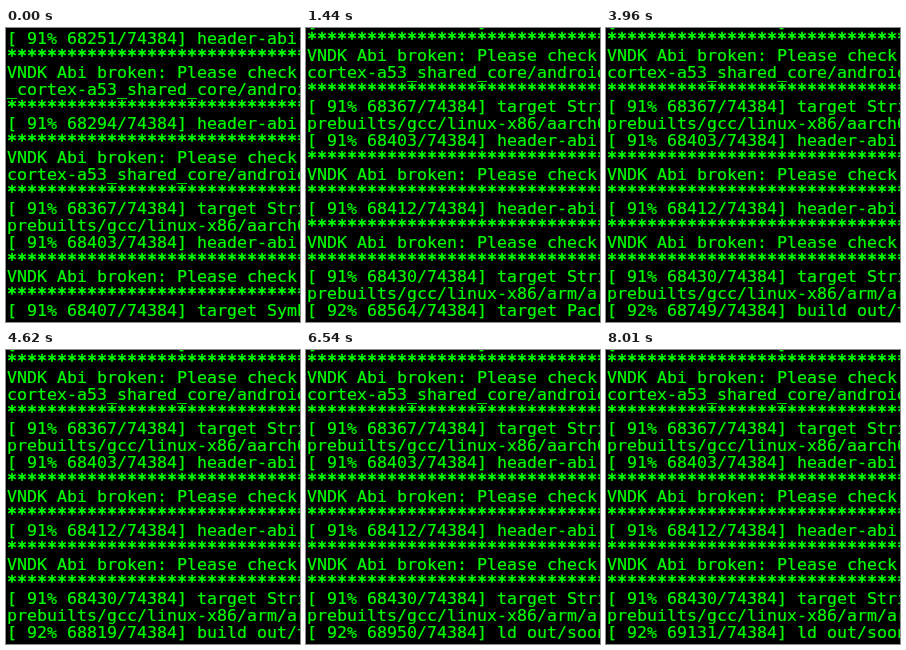
An HTML page with a canvas for the animation above (8.04 s loop, 294 by 294 pixels).

```html
<!DOCTYPE html>
<html lang="en">
<head>
<meta charset="utf-8">
<title>Build log</title>
<style>
html, body { margin: 0; width: 100%; height: 100%; overflow: hidden; background: #000; }
canvas { display: block; }
</style>
</head>
<body>
<canvas id="screen" width="294" height="294"></canvas>
<script>
const ctx = document.getElementById('screen').getContext('2d');
const LOOP = 8040, TICK = 30, TOTAL = 74384;
const LINE = 17, ROWS = 18, LEFT = 1, LAST_BASELINE = 288;

const STARS = '*'.repeat(30);
const BROKEN = 'VNDK Abi broken: Please check ';
const HEADER = 'header-abi-diff', STRIP = 'target Strip', SYMBOLS = 'target Symbolic';
const PACKAGE = 'target Package', BUILD = 'build out/target', LINK = 'ld out/soong';

const job = (count, task, ...output) => ({ count, task, output });
const abiJob = (count, ...paths) => job(count, HEADER, STARS, BROKEN, ...paths, STARS);

const JOBS = [
  abiJob(68251, '_cortex-a53_shared_core/android'),
  abiJob(68294, 'cortex-a53_shared_core/android'),
  job(68367, STRIP, 'prebuilts/gcc/linux-x86/aarch64'),
  abiJob(68403),
  abiJob(68412),
  job(68430, STRIP, 'prebuilts/gcc/linux-x86/arm/arm')
];

// Each stage starts at a time with a step count and its usual task
const STAGES = [
  { time: 0, count: 68407, task: SYMBOLS },
  { time: 690, count: 68430, task: STRIP },
  { time: 720, count: 68510, task: PACKAGE },
  { time: 2790, count: 68664, task: BUILD },
  { time: 3960, count: 68749, task: BUILD },
  { time: 5310, count: 68893, task: HEADER },
  { time: 6540, count: 68950, task: LINK },
  { time: 8010, count: 69131, task: LINK }
];

const progress = ({ count, task }) =>
  `[ ${Math.floor(count / TOTAL * 100)}% ${count}/${TOTAL}] ${task}`;

// Steps advance evenly within a stage; every seventh one is another kind of task.
function statusAt(time) {
  const index = STAGES.findLastIndex(stage => stage.time <= time);
  const from = STAGES[index], to = STAGES[index + 1] || from;
  const part = (time - from.time) / (to.time - from.time || 1);
  const count = Math.round(from.count + (to.count - from.count) * part);
  const other = from.task === HEADER ? LINK : HEADER;
  return { count, task: count % 7 === 5 ? other : from.task };
}

function draw(time) {
  const status = statusAt(time);
  const lines = JOBS.filter(({ count }) => count < status.count)
    .flatMap(done => [progress(done), ...done.output]);
  lines.push(progress(status));

  ctx.fillStyle = '#000';
  ctx.fillRect(0, 0, 294, 294);
  ctx.fillStyle = ctx.strokeStyle = '#0f0';
  ctx.font = '16.61px "DejaVu Sans Mono", monospace';
  lines.slice(-ROWS).reverse().forEach((text, row) => {
    const y = LAST_BASELINE - row * LINE;
    ctx.lineWidth = text === STARS ? 0.7 : 0.2;
    ctx.fillText(text, LEFT, y);
    ctx.strokeText(text, LEFT, y);
  });
}

function frame() {
  const time = performance.now() % LOOP;
  draw(Math.floor(time / TICK) * TICK);
  requestAnimationFrame(frame);
}
frame();
</script>
</body>
</html>
```
